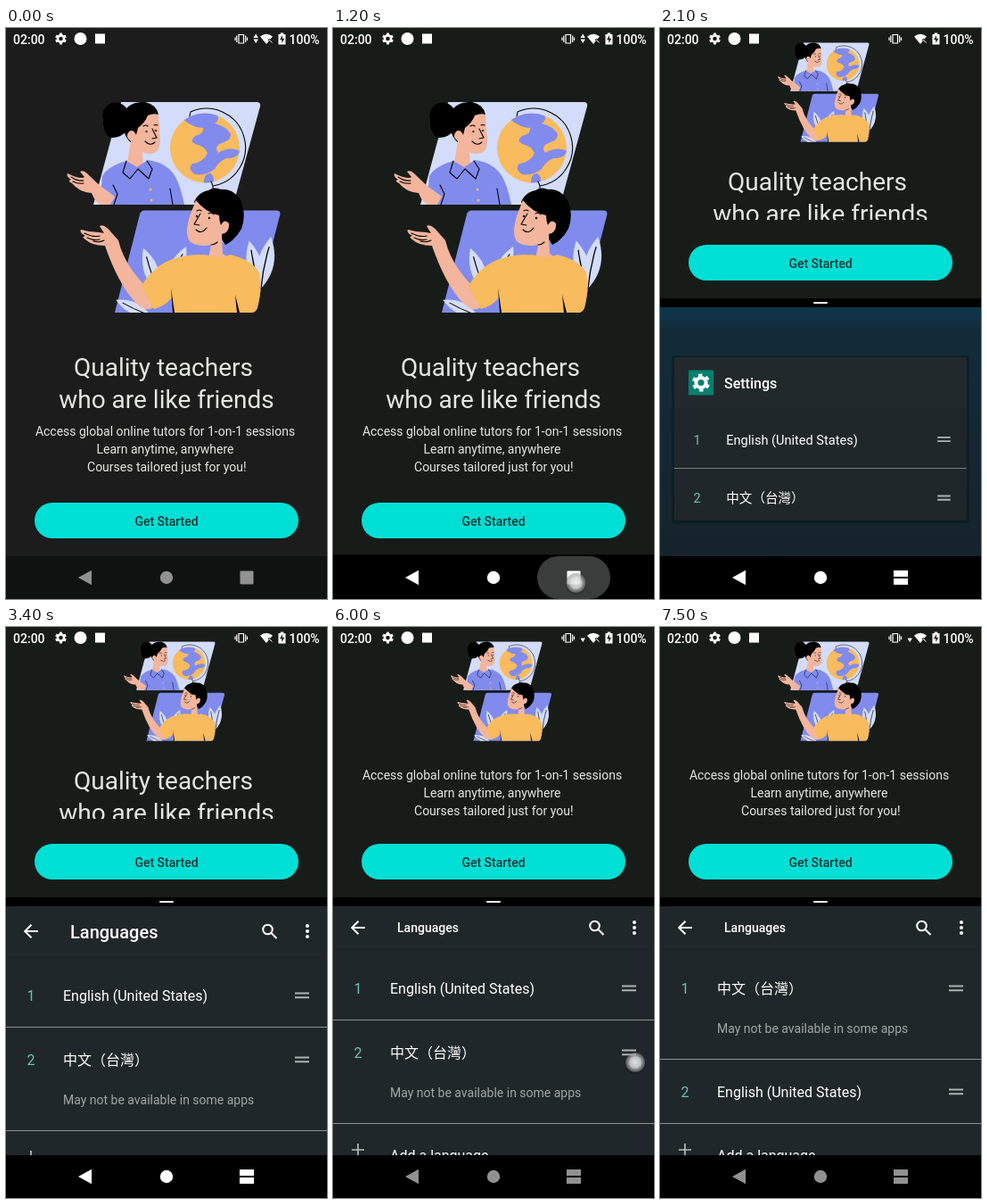
Write an HTML page that moves like this. It is 360x640 px and loops after 8000 ms.

```html
<!DOCTYPE html>
<html lang="en">
<head>
<meta charset="utf-8">
<title>Split screen languages</title>
<style>
html, body { margin: 0; width: 100%; height: 100%; overflow: hidden; background: #000; }
svg { display: block; width: 100%; height: 100%; }
text { font: 14px Roboto, "Noto Sans CJK TC", "Noto Sans CJK", sans-serif; }
.medium { font-weight: 500; }
.item { font-size: 16px; fill: #fff; }
.num { font-size: 16px; fill: #6cc3b2; text-anchor: middle; }
.mid { text-anchor: middle; }
.line { fill: none; stroke: #000; stroke-width: 1.1; stroke-linecap: round; stroke-linejoin: round; }
.skin { fill: #f3b59c; }
.blue { fill: #808bed; }
.pale { fill: #d3dcfa; }
.gold { fill: #f8bb5d; }
</style>
</head>
<body>
<svg viewBox="0 0 360 640">
  <defs>
    <linearGradient id="sky" gradientUnits="userSpaceOnUse" x1="0" y1="303" x2="0" y2="592">
      <stop offset="0" stop-color="#07527b"/>
      <stop offset=".08" stop-color="#0a486c"/>
      <stop offset=".12" stop-color="#0e384f"/>
      <stop offset=".5" stop-color="#122f40"/>
      <stop offset="1" stop-color="#15242b"/>
    </linearGradient>
    <radialGradient id="glow">
      <stop offset="0" stop-color="#f4f4f4" stop-opacity=".9"/>
      <stop offset=".55" stop-color="#ddd" stop-opacity=".85"/>
      <stop offset=".75" stop-color="#c4c4c4" stop-opacity=".6"/>
      <stop offset="1" stop-color="#aaa" stop-opacity=".35"/>
    </radialGradient>
    <clipPath id="appClip"><rect id="appBox" width="360"/></clipPath>
    <clipPath id="copyClip"><rect id="copyBox" width="360"/></clipPath>
    <clipPath id="cardClip"><rect id="cardBox" rx="2"/></clipPath>
    <clipPath id="globeClip"><circle cx="223" cy="134.500" r="39"/></clipPath>
    <clipPath id="artClip"><rect y="60" width="360" height="259"/></clipPath>
    <g id="gear">
      <circle r="3.600" fill="none" stroke="#fff" stroke-width="2.600"/>
      <circle r="5.300" fill="none" stroke="#fff" stroke-width="2.400" pathLength="12" stroke-dasharray="1 1" stroke-dashoffset="1.500"/>
    </g>
    <g id="leaf">
      <path class="pale" d="M0 0Q-16-22 0-50Q15-24 0 0"/>
      <path class="line" d="M0 0Q-2-20 0-40"/>
    </g>
    <path id="grip" d="M324-3.500h16v2.100h-16zM324 1.200h16v2.100h-16z" fill="#adb2b3"/>
  </defs>

  <rect y="303" width="360" height="289" fill="url(#sky)"/>
  <rect id="dim" y="303" width="360" height="289" fill="#16242c"/>

  <rect id="cardShade" x="13" y="367" width="334" height="188" rx="4"/>
  <g id="panel" clip-path="url(#cardClip)">
    <g id="page">
      <rect width="360" height="279" fill="#20272a"/>
      <g id="list">
        <g id="addRow">
          <path d="M21 281h14M28 274v14" stroke="#b9bdbe" stroke-width="1.700"/>
          <text class="item" x="64" y="293">Add a language</text>
        </g>
        <g id="english">
          <text class="num" id="num1" x="28" y="106"></text>
          <text class="item" x="64" y="106">English (United States)</text>
          <use href="#grip" y="100"/>
          <rect y="135" width="360" height="1" fill="#8b9394"/>
        </g>
        <g id="chinese">
          <rect id="shade" y="134" width="360" height="120"/>
          <rect y="136" width="360" height="115" fill="#20272a"/>
          <text class="num" id="num2" x="28" y="178"></text>
          <text class="item" x="64" y="178" lang="zh-TW">中文（台灣）</text>
          <text x="64" y="222" fill="#a0a5a6">May not be available in some apps</text>
          <use href="#grip" y="172"/>
          <rect y="251" width="360" height="1" fill="#8b9394"/>
        </g>
      </g>
      <rect id="bar" width="360" fill="#20272a"/>
      <rect id="barEdge" width="360" height="1" fill="#1a2023"/>
      <text id="title" class="medium" x="72" fill="#fff">Languages</text>
      <g id="tools" fill="none" stroke="#fff" stroke-width="2">
        <path d="M36 28H21.500M28.500 20.700L21.200 28L28.500 35.300"/>
        <circle cx="293.500" cy="26" r="5.300"/>
        <path d="M297.500 30l6 6"/>
        <g fill="#fff" stroke="none"><circle cx="338" cy="22" r="2"/><circle cx="338" cy="28" r="2"/><circle cx="338" cy="34" r="2"/></g>
      </g>
    </g>
    <g id="cardHead">
      <rect width="360" height="57" y="369" fill="#22292c"/>
      <rect x="32" y="383.500" width="28" height="28" rx="1" fill="#06806f"/>
      <use href="#gear" transform="translate(46 397.500) scale(1.550)"/>
      <text class="medium" x="72" y="403.500" style="font-size:16px" fill="#fff">Settings</text>
    </g>
  </g>

  <g id="app" clip-path="url(#appClip)">
    <rect id="back" width="360" height="592"/>
    <g id="art" clip-path="url(#artClip)">
      <path class="pale" d="M129 83H281q5 0 4 5L256 194q-1 4-5 4H98z"/>
      <g clip-path="url(#globeClip)">
        <rect class="gold" x="183" y="95" width="80" height="80"/>
        <path class="blue" d="M198 102Q214 92 236 97Q241 102 234 107Q247 110 252 119Q252 126 244 128Q232 132 238 140Q250 132 263 138Q258 147 247 146Q238 150 234 158Q224 166 212 164Q203 158 209 152Q222 150 226 140Q222 132 212 130Q205 126 212 121Q222 119 221 112Q210 112 198 102zM222 175q-1-12 7-12q6 3 3 14z"/>
      </g>
      <path class="line" d="M206 99L207 94A43.700 43.700 0 1 1 232 177L230 172M232 177v4"/>
      <path d="M227 183q3-5 12-3l3 4z"/>
      <path d="M131 96Q138 82 156 83Q169 86 171 97Q162 99 157 107Q150 110 148 116L142 130Q131 122 132 108z"/>
      <circle cx="123" cy="98" r="14.500"/><path d="M109 101Q108 115 116 123Q132 124 138 110z"/>
      <path class="skin" d="M148 112Q156 106 159 98Q166 95 171 97L173 126Q173 141 161 141Q156 141 153 139L154 153Q147 164 136 151L140 127Q133 122 138 116Q143 113 146 120z"/>
      <path class="line" d="M164 113l5 10-5 1M156 127q6 6 11 1M154 110q3-2 5 0M166 109q2-1 4 0"/>
      <circle cx="157.500" cy="116" r="1.100"/><circle cx="168" cy="115" r="1.100"/>
      <path class="skin" d="M69 163Q78 168 86 168L88 167L83 161Q87 158 94 166Q110 182 124 190L118 198H106Q100 195 96 185Q82 184 74 174Q68 171 73 170Q67 166 69 163"/>
      <path class="line" d="M73 167q7 5 14 4M75 172q6 3 12 2"/>
      <path class="blue" d="M108 166Q114 155 135 149L147 156L159 148Q181 151 190 167Q196 178 200 198H117L122 189L107 178z"/>
      <path class="line" d="M135 149l-4 13 8 7 9-11 12 11 4-11-6-9M120 176l5 10-4 12M184 180l3 18"/>
      <circle class="gold" cx="162" cy="181" r="1.500"/><circle class="gold" cx="163" cy="193" r="1.500"/>

      <path class="blue" d="M156 204.500H303q6 0 4 6L280 315q-1 4-5 4H122L150 209q1-4.500 6-4.500z"/>
      <use href="#leaf" transform="translate(172 296) rotate(-20) scale(1.050)"/>
      <use href="#leaf" transform="translate(181 290) rotate(25)"/>
      <use href="#leaf" transform="translate(162 322) rotate(-66) scale(.85)"/>
      <use href="#leaf" transform="translate(285 292) rotate(-13) scale(1.100)"/>
      <use href="#leaf" transform="translate(286 292) rotate(11) scale(1.180)"/>
      <path d="M211 195Q217 180 238 181Q255 179 263 193Q270 209 264 225Q257 238 246 243L234 224z"/>
      <path class="skin" d="M213 193Q224 207 239 210Q239 216 241 221Q245 213 250 219Q251 229 242 231L243 253Q250 257 252 261L226 265L230 243Q214 246 206 239Q200 231 206 211z"/>
      <path class="line" d="M218 208l-7 12 6 1M213 226q6 6 12-2M214 205q3-2 5 0M227 208q4-2 6 1M230 243q4 0 7-3"/>
      <circle cx="214" cy="211" r="1.200"/><circle cx="228" cy="213" r="1.200"/>
      <path class="skin" d="M84 226Q94 229 104 229L110 230L105 222Q110 219 118 229L126 238Q132 264 156 289L171 309Q160 320 150 312Q128 293 111 244Q96 244 89 237Q84 234 89 233Q82 229 84 226"/>
      <path class="line" d="M88 230q10 5 17 3M91 235q8 4 14 2M98 239q6 2 12-1"/>
      <path class="gold" d="M152 289Q166 265 190 258Q210 252 229 255Q241 260 251 254Q275 259 284 274Q288 292 282 314Q280 319 275 319H188L186 302Q180 311 166 315z"/>
      <path d="M185 291l4 28h-2zM257 299l5 20h-3z"/>
    </g>
    <g clip-path="url(#copyClip)">
      <g id="copy" fill="#e4e6e2" class="mid">
        <text x="176.500" y="390" style="font-size:28px">Quality teachers</text>
        <text x="180" y="426" style="font-size:28px">who are like friends</text>
        <text x="178.500" y="457">Access global online tutors for 1-on-1 sessions</text>
        <text x="178.500" y="477">Learn anytime, anywhere</text>
        <text x="180.300" y="497">Courses tailored just for you!</text>
      </g>
    </g>
    <g id="button">
      <rect x="32" y="532" width="296" height="40" rx="20" fill="#00dfd5"/>
      <text class="medium mid" x="180" y="557.500" fill="#1c3434">Get Started</text>
    </g>
  </g>

  <g id="divider">
    <rect width="360" height="10"/>
    <rect x="172" y="4" width="16" height="2" rx="1" fill="#fff"/>
  </g>

  <g fill="#fff">
    <text class="medium" x="8" y="17.500">02:00</text>
    <use href="#gear" x="61.500" y="12"/>
    <circle cx="83.500" cy="12" r="7"/>
    <rect x="100" y="6.500" width="11" height="11"/>
    <path d="M261 7.500h5.500v9.500h-5.500zM258.800 8.500v7.500M268.700 8.500v7.500M257 10.500v3.500M270.500 10.500v3.500" fill="none" stroke="#fff" stroke-width="1.200"/>
    <path id="up" d="M277.500 11l2.700-4.500 2.700 4.500z"/>
    <path id="down" d="M277.500 12.500l2.700 4.500 2.700-4.500z"/>
    <path d="M285 9.500Q292 4 299 9.500L292 18z"/>
    <path d="M294.500 12.500l4 4M298.500 12.500l-4 4" stroke="#181c18" stroke-width="2.400"/>
    <path d="M295 13l3.500 3.500" stroke="#fff"/>
    <path d="M305.500 7h2.300V5.500h3.400V7h2.300v11.500h-8z"/>
    <path d="M310 8l-3 5.200h2.300V17l3-5.300H310z" fill="#181c18"/>
    <text class="medium" x="317.500" y="17.500">100%</text>
  </g>

  <rect id="nav" y="592" width="360" height="48"/>
  <rect id="ripple" x="229" y="592" width="82" height="48" rx="24" fill="#3b3d3c"/>
  <g id="keys">
    <path d="M81 616l15-8.300v16.600z"/>
    <circle cx="180" cy="616" r="7.200"/>
    <rect id="square" x="262.500" y="608.500" width="15" height="15" rx="1"/>
    <path id="halves" d="M262 608h16v7h-16zM262 617h16v7h-16z"/>
  </g>
  <g id="touch">
    <circle r="12" cy="1" opacity=".2"/>
    <circle r="11" fill="url(#glow)"/>
  </g>
</svg>
<script>
const LOOP = 8000;
const el = {};
document.querySelectorAll("svg [id]").forEach(n => el[n.id] = n);

const set = (id, attrs) => {
  for (const k in attrs) el[id].setAttribute(k, attrs[k]);
};
const show = (id, on) => set(id, { display: on ? "inline" : "none" });
const move = (id, x, y) => set(id, { transform: `translate(${x} ${y})` });
const mix = (a, b, k) => a + (b - a) * k;
const ramp = (t, a, b) => Math.min(1, Math.max(0, (t - a) / (b - a)));
const ease = (t, a, b) => { const k = ramp(t, a, b); return k * k * (3 - 2 * k); };
const easeOut = (t, a, b) => 1 - (1 - ramp(t, a, b)) ** 2;

function topApp(t) {
  const split = t >= 1700;
  const scroll = 78 * ease(t, 4200, 4900);
  set("appBox", { height: mix(592, 303, ease(t, 1200, 1400)) });
  set("back", { fill: t < 600 ? "#1c1c1c" : "#181c18" });
  set("art", { transform: split ? "translate(99.900 -22.700) scale(.472)" : "" });
  set("copyBox", split ? { y: 144, height: 71 } : { y: 340, height: 252 });
  move("copy", 0, split ? -208 - scroll : 0);
  move("button", 0, split ? -289 : 0);
  show("up", t < 1800);
  show("down", t < 1800 || t >= 4800);
}

function settings(t) {
  const open = ease(t, 3000, 3350);
  const compact = t >= 3500;
  const x = mix(16, 0, open), y = mix(370, 313, open), scale = mix(0.911, 1, open);
  const top = mix(369, 313, open);
  const arrive = ramp(t, 1250, 1480);
  set("panel", { opacity: arrive });
  set("cardShade", { opacity: 0.25 * arrive * (1 - open) });
  set("cardBox", { x, y: top, width: 360 - 2 * x, height: mix(551.5, 592, open) - top });
  set("page", { transform: `translate(${x} ${y}) scale(${scale})` });
  move("cardHead", 0, top - 369);
  set("cardHead", { opacity: 1 - open });
  set("dim", { opacity: 0.6 * ramp(t, 1500, 1900) });

  const barHeight = compact ? 48 : 57;
  set("bar", { height: barHeight });
  set("barEdge", { y: barHeight });
  set("title", { y: compact ? 29 : 36 });
  el.title.style.fontSize = compact ? "14px" : "20px";
  move("tools", 0, compact ? -4 : 0);
  move("list", 0, compact ? -8 : 0);

  // the lower row follows the finger until it reaches the top slot
  const drag = -111 * ease(t, 6400, 7050);
  const swapped = t >= 6780;
  move("chinese", 0, Math.max(-72, drag));
  move("english", 0, 116 * ease(t, 6780, 7050));
  set("shade", { opacity: 0.25 * ramp(t, 6400, 6500) * (1 - ramp(t, 7050, 7200)) });
  el.num1.textContent = swapped ? 2 : 1;
  el.num2.textContent = swapped ? 1 : 2;
}

function navigation(t) {
  const bright = ramp(t, 600, 800) * (1 - ramp(t, 3800, 4300));
  const grey = Math.round(mix(145, 255, bright));
  set("keys", { fill: `rgb(${grey},${grey},${grey})` });
  set("nav", { fill: t < 600 ? "#101111" : t < 1200 ? "#0b0f0e" : "#000" });
  set("ripple", { opacity: ramp(t, 700, 950) * (1 - ramp(t, 1600, 1900)) });
  show("square", t < 1400);
  show("halves", t >= 1400);
  const y = mix(mix(592, 326, easeOut(t, 1200, 1500)), 303, easeOut(t, 1500, 1700));
  move("divider", 0, y);
  show("divider", t >= 1200);
}

function finger(t) {
  const drag = ease(t, 6400, 7050);
  const touches = [
    [700, 1600, 272.5, 622],
    [2900, 3050, 180, 470],
    [4100, 4800, 200, mix(190, 60, ease(t, 4200, 4750))],
    [6000, 7300, mix(339, 347, drag), mix(488, 377, drag)]
  ];
  const now = touches.find(([from, to]) => t >= from && t < to);
  show("touch", now);
  if (now) move("touch", now[2], now[3]);
}

function draw(t) {
  topApp(t);
  settings(t);
  navigation(t);
  finger(t);
}

const start = performance.now();
function tick() {
  draw((performance.now() - start) % LOOP);
  requestAnimationFrame(tick);
}
tick();
</script>
</body>
</html>
```
